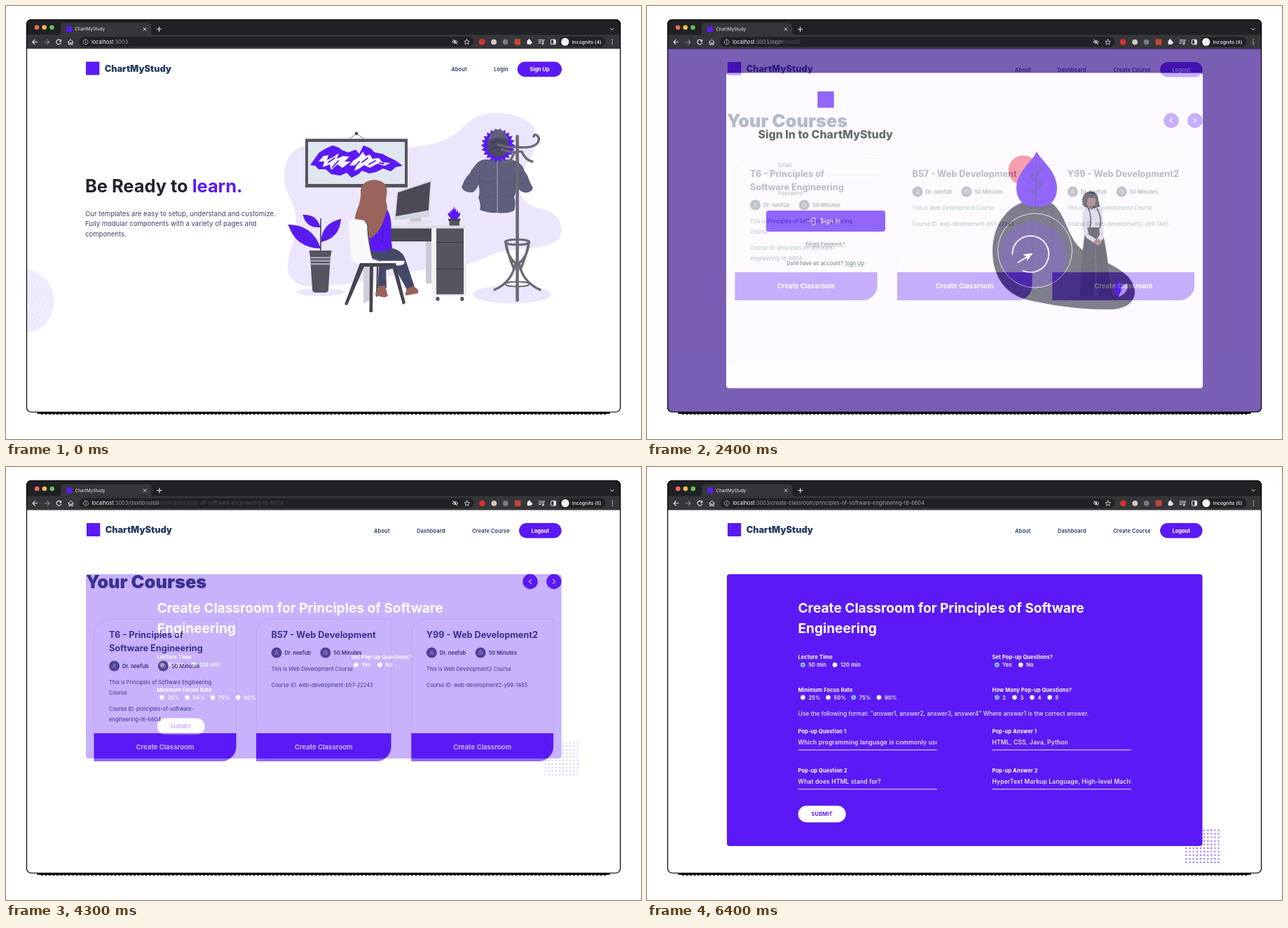
These frames come from a looping animation (906 by 618 pixels, 8 s). An HTML page:

```html
<!DOCTYPE html>
<html lang="en">
<head>
<meta charset="utf-8">
<title>Course platform tour</title>
<style>
html, body { margin: 0; width: 100%; height: 100%; overflow: hidden; background: #fff; }
svg { display: block; }
text { font-family: Inter, "Noto Sans", sans-serif; font-optical-sizing: none; white-space: pre; }
</style>
</head>
<body>
<svg id="stage" width="906" height="618" viewBox="0 0 906 618" xmlns="http://www.w3.org/2000/svg"></svg>
<script>
const BRAND = 'ChartMyStudy', TEACHER = 'Dr. neefub';
const MAIN = '#5b1af5', INK = '#273c60', DARK = '#55545f', PALE = '#ece6fc', NIGHT = '#2f2e41';
const SMALL = 7.43;

// y is the middle of the capital letters
const text = (x, y, s, size, weight = 400, fill = INK, extra = '') =>
  `<text x="${x}" y="${y + size * 0.364}" font-size="${size}" font-weight="${weight}" fill="${fill}" ${extra}>${s}</text>`;
const mid = (x, y, s, size, weight, fill, extra = '') => text(x, y, s, size, weight, fill, 'text-anchor="middle" ' + extra);
const rect = (x, y, w, h, fill, r = 0, extra = '') =>
  `<rect x="${x}" y="${y}" width="${w}" height="${h}" rx="${r}" fill="${fill}" ${extra}/>`;
const disc = (x, y, r, fill, extra = '') => `<circle cx="${x}" cy="${y}" r="${r}" fill="${fill}" ${extra}/>`;
const oval = (x, y, rx, ry, fill, extra = '') => `<ellipse cx="${x}" cy="${y}" rx="${rx}" ry="${ry}" fill="${fill}" ${extra}/>`;
const shape = (d, fill, extra = '') => `<path d="${d}" fill="${fill}" ${extra}/>`;
const line = (d, color, w = 1, extra = '') =>
  `<path d="${d}" fill="none" stroke="${color}" stroke-width="${w}" stroke-linecap="round" stroke-linejoin="round" ${extra}/>`;
const move = (x, y, s) => `<g transform="translate(${x} ${y})">${s}</g>`;

function chrome(path, windows) {
  const w = '#e8eaed', bar = '#35363a', deep = '#202125';
  return rect(20, 10, 866, 51, bar) + rect(20, 10, 866, 31, deep)
    + shape('M74 41Q78 41 78 37V29Q78 24 83 24H202Q207 24 207 29V37Q207 41 211 41Z', bar)
    + disc(44, 30.5, 3.3, '#ee6a5f') + disc(54.6, 30.5, 3.3, '#f5bd4f') + disc(65.4, 30.5, 3.3, '#61c454')
    + rect(86, 29, 8, 8, MAIN, 0.8) + text(98.5, 32.8, BRAND, 6.25, 400, w)
    + line('M196 31l4 4m0-4l-4 4', w, 0.9) + line('M215.2 33h6.6m-3.3-3.3v6.6', w, 1.1)
    + line('M862.3 31.8l2.4 2.4 2.4-2.4', w, 1)
    + line('M44.8 51.3h-7m3.2-3.2l-3.2 3.2 3.2 3.2', w, 1.1)
    + line('M54.8 51.3h7m-3.2-3.2l3.2 3.2-3.2 3.2', '#85878b', 1.1)
    + line('M77.9 49.2A3.4 3.4 0 1 0 78.5 52', w, 1.1) + shape('M78.9 47.3v3.4h-3.4z', w)
    + line('M88.3 51.5l3.9-3.7 3.9 3.7M89.5 51v4h1.9v-2.6h1.6v2.6h1.9v-4', w, 1)
    + rect(104, 44, 563, 14, deep, 7)
    + line('M113.6 47.7a3.5 3.5 0 1 0 .01 0M113.6 51v2', '#c3c6ca', 0.8) + disc(113.6, 49.5, 0.5, '#c3c6ca')
    + text(122, 51.2, `localhost<tspan fill="#9aa0a6">:3003${path}</tspan>`, 7.36, 400, '#f1f3f4')
    + line('M636.8 51.2Q640.5 46.8 644.3 51.2Q640.5 55.6 636.8 51.2M637.5 47.8l6.2 6.8', w, 0.9) + disc(640.5, 51.2, 1.2, w)
    + line('M657.5 47.5l1.1 2.6 2.7.2-2.1 1.8.7 2.7-2.4-1.5-2.4 1.5.7-2.7-2.1-1.8 2.7-.2z', w, 0.8)
    + disc(679, 51.3, 4.4, '#d8322c') + disc(696, 51.3, 3.9, '#d9c8bd') + disc(712.5, 51.3, 3.9, '#777b82')
    + rect(725.5, 47, 8.6, 8.6, '#c2463a', 1)
    + rect(743.4, 49, 5.8, 5.8, w, 0.8) + disc(746.3, 48.6, 1.5, w) + disc(749.2, 51.9, 1.5, w)
    + line('M759.8 48.4h6m-6 2.3h6m-6 2.3h3.2M766.8 53.5v-5h1.4', w, 0.9) + disc(765.8, 53.8, 1.2, w)
    + rect(777.3, 48, 6.8, 6.6, 'none', 0.6, `stroke="${w}"`) + rect(781, 48, 3, 6.6, w)
    + rect(789, 44, 66, 14, deep, 7) + disc(797.6, 51.2, 5.6, '#f1f3f4')
    + text(807.5, 51.2, `Incognito (${windows})`, 6.85, 500, '#f1f3f4')
    + [48.3, 51.2, 54.1].map(y => disc(865, y, 0.8, w)).join('');
}

const pill = (x, y, w, label) => rect(x, y, w, 21.5, MAIN, 10.75) + mid(x + w / 2, y + 11, label, SMALL, 700, '#fff');
const nav = (x, y, s) => mid(x, y, s, SMALL, 600, INK, 'letter-spacing=".15"');
const logo = (x, y) => rect(x, y, 19.3, 19, MAIN, 0.8) + text(x + 26.7, y + 9.5, BRAND, 12.75, 900);

function leaf(x1, y1, x2, y2, b) {
  const mx = (x1 + x2) / 2, my = (y1 + y2) / 2, px = (y2 - y1) * b, py = (x1 - x2) * b;
  return shape(`M${x1} ${y1}Q${mx + px} ${my + py} ${x2} ${y2}Q${mx - px} ${my - py} ${x1} ${y1}`, MAIN)
    + line(`M${x1} ${y1}L${x2} ${y2}`, NIGHT, 0.5);
}

function picture() {
  return line('M490 190L500 182L511 190', DARK, 0.8) + disc(500, 182, 2.2, '#3f3e4a')
    + rect(427, 189.5, 146, 69.5, DARK) + rect(431, 194, 138, 60, '#dfe6ef')
    + shape('M434 227L441 217L447 209L455 204L466 199L475 202L480 206L488 209L499 205L504 211L510 199L520 203L526 209L537 211L546 216L555 220L566 228L556 230L549 236L538 232L528 237L518 239L508 235L503 240L493 245L486 238L477 242L464 240L456 233L446 233L441 228Z', MAIN)
    + shape('M446 222L453 214L460 213L458 220L466 216L475 210L472 218L481 214L490 215L483 222L492 222L480 231L473 226L464 234L462 226L452 230L454 222Z'
      + 'M495 221L504 215L509 208L513 214L519 212L523 218L532 217L537 223L548 224L540 228L530 225L519 231L511 227L504 232L497 235L500 227L490 228Z', '#f5f5fb')
    + line('M460 223l9-6m-3 13l8-9M508 223l8-6m2 9l9-5m6 3l6 1M497 230l7-8', MAIN, 1.8);
}

function plant() {
  return oval(449, 408.5, 35, 5.5, PALE) + line('M449 304V350', DARK, 1.8)
    + leaf(448.5, 316, 423.5, 298, 0.42) + leaf(449, 337, 478, 304, 0.38) + leaf(449, 346, 402.5, 312, 0.36)
    + shape('M432.5 349H464.5L463.5 356H433.5ZM433.8 355H463L460 405Q459.6 409 455 409H442Q437.5 409 437 405Z', DARK)
    + [358, 362.5, 367].map(y => rect(434.6, y, 27.8, 2.4, '#a6a4b8')).join('');
}

function desk() {
  const spikes = [-8, -5, -2.2, 0, 2.2, 5, 8].map(d => {
    const top = 286 + Math.abs(d) * 1.1;
    return `M${637.5 + d / 4} 304Q${636 + d} 297 ${639.5 + d} ${top}Q${642 + d} 297 ${642 + d / 4} 304Z`;
  }).join('');
  return shape('M510 372L519 360V420L510 424Z', '#cfcfd9') + rect(599, 317, 9, 79, '#c9cad5') + rect(607, 317, 7, 103, '#f2f2f6')
    + rect(614, 317, 39, 95, DARK) + rect(653, 317, 4, 96, '#ececf1') + rect(612, 411.5, 43, 2.5, '#ececf1')
    + line('M614 337.5H653M614 375.5H653', '#3c3b47', 1) + oval(616, 418, 2.6, 3, DARK) + oval(650.8, 418, 2.6, 3, DARK)
    + rect(548, 317, 59, 19, '#4a4954') + rect(518, 313.5, 139, 4, '#dedee5')
    + rect(632.5, 305, 14.5, 8.5, DARK, 1) + rect(631, 303.5, 17.5, 3, '#45444f', 0.6) + shape(spikes, MAIN)
    + shape('M576 302L591 299L593 309H577Z', '#c5c7d2') + shape('M569 309L604 305L612 309L577 313Z', '#e2e3ea')
    + shape('M558 265L607 249L604 301L554 306Z', '#d5d7e0') + shape('M559.2 266.2L605.6 251L602.7 291.5L556 300.2Z', '#4b4a56');
}

function sitter() {
  const skin = '#98645c', pants = '#454968';
  return line('M530 372L529 414', '#3f3e4a', 2)
    + shape('M520 348L549 345Q566 349 570 362L583 401L572 405L555 374L542 377L543 402L530 403L532 371L519 363Z', pants)
    + shape('M531 400L541 399L545 414L540 416L527 413Q526 409 530 407Z', skin)
    + shape('M571 404L581 400Q590 404 588 410L572 413Q567 411 571 408Z', skin)
    + shape('M514 296Q530 283 542 288Q552 299 549 330L551 345Q540 353 520 349Z', MAIN)
    + line('M534 300Q540 322 536 340', '#4510c4', 1)
    + shape('M506 264C506 248 531 243 541 255C547 264 540 274 543 282C546 293 540 299 538 309C533 320 527 329 518 332C506 330 498 320 498 308C497 292 507 286 506 264Z', skin)
    + shape('M488 310Q488 304 495 304L510 306Q516 308 516 315Q516 340 522 360L535 364L568 364Q570 369 562 370H521Q498 370 492 362Q491 334 488 310Z', '#fafafc', 'stroke="#e2e2ea" stroke-width=".7"')
    + line('M512 307Q517 311 516 318Q517 340 524 361L534 364', '#494853', 1.3)
    + shape('M505 367H556L570 424L566 426L551 372H524L523 437H518.5L519 372H511L487 427L483 426Z', '#45444f');
}

function coat() {
  const cloth = '#5d5f7d', pole = '#6b6975';
  const fur = Array.from({ length: 44 }, (_, i) => {
    const a = i * Math.PI / 22, r = i % 2 ? 20 : 24.5;
    return (702 + r * Math.cos(a)).toFixed(1) + ' ' + (199 + r * Math.sin(a)).toFixed(1);
  }).join('L');
  const flip = d => line(d, pole, 3.4) + line(d, pole, 3.4, 'transform="matrix(-1 0 0 1 1459 0)"');
  return oval(722, 411.5, 55.5, 13, PALE)
    + shape('M687 219Q675 218 669 228Q664 233 661 240Q654 246 650 259Q654 267 666 266Q672 262 674 255Q677 265 674 274Q678 282 676 291Q688 296 701 295Q715 297 725 292Q728 282 725 273Q729 264 727 253Q731 263 738 266Q748 268 752 260Q747 251 744 242Q740 237 737 229Q729 219 717 219Z', cloth)
    + line('M674 255Q677 248 676 239M727 253Q724 246 726 239M678 250Q688 254 698 250M678 270Q688 274 698 270M704 250Q714 254 724 250M704 270Q714 274 724 270', '#50526f', 0.9)
    + line('M701 222V294', '#8a8ca8', 1.5)
    + shape('M' + fur + 'Z', MAIN) + oval(702, 200, 15.5, 16, '#4b4a63')
    + shape('M688 192Q692 176 702 176Q713 177 717 192Q704 184 688 192Z', '#5d5f7d')
    + line('M694 195Q702 190 712 195M692 204Q702 199 714 204', '#35344a', 1)
    + line('M729.5 186V420', pole, 4.6, 'stroke-linecap="butt"')
    + line('M702 198Q716 203 728 201Q748 204 757 197Q763 190 758 185Q754 182 753 186M709 223Q720 224 723 214Q726 206 736 208Q741 220 751 222M708 205Q722 210 730 208', pole, 3.4)
    + flip('M713 338Q715 358 727 367Q722 394 697 405M713 336Q715 352 725 376')
    + oval(729.5, 337, 17, 3.8, 'none', `stroke="${pole}" stroke-width="3"`)
    + oval(729.5, 397, 17, 3.4, 'none', `stroke="${pole}" stroke-width="2"`);
}

function home() {
  return rect(20, 61, 866, 540, '#fff') + chrome('', 4) + logo(114, 79.5)
    + nav(646.5, 90.5, 'About') + nav(706.5, 90.5, 'Login') + pill(729.7, 79.5, 63.3, 'Sign Up')
    + disc(22, 421.5, 46.5, 'url(#crackle)')
    + text(113, 257, `Be Ready to <tspan fill="${MAIN}">learn.</tspan>`, 25.4, 700, '#20232d')
    + ['Our templates are easy to setup, understand and customize.', 'Fully modular components with a variety of pages and', 'components.']
      .map((s, i) => text(113, 296.5 + i * 14.5, s, 9.55, 400, '#3a4564')).join('')
    + shape('M397 240C398 212 415 195 445 200C500 206 550 207 583 201C640 194 645 176 668 160C690 148 735 150 752 172C765 196 748 215 738 235C726 262 735 284 762 289C790 294 797 315 790 330C775 352 720 342 690 356C660 372 640 371 610 375C560 380 500 398 450 400C420 403 400 395 402 365C408 335 418 320 412 290C405 270 396 262 397 240Z', PALE)
    + picture() + plant() + desk() + sitter() + coat();
}

function clockScene() {
  const skin = '#8f5d60', shirt = '#d0cde1';
  return disc(537, 234.5, 21.3, '#ee6f86')
    + shape('M493 350C493 308 520 277 556 276C588 274 594 306 606 329C622 362 655 358 684 384C705 404 699 433 660 433C620 434 575 427 541 419C508 410 493 382 493 350Z', '#3f3d53')
    + oval(555, 286.5, 23, 3, '#35334a')
    + shape('M556 207.5C562 221 585 235 585 260C585 280 572 287 556 287C540 287 527 279 527 259C528 236 550 222 556 207.5Z', MAIN)
    + line('M554.5 287L556 223M555 262L565 252M555.2 252L546 241M555.5 243L563 232M555 270L545 261M549 245V238M561 256V248', NIGHT, 1)
    + disc(551, 356, 48, '#47308b', 'clip-path="url(#dial)"')
    + disc(553.5, 349, 53, 'none', 'stroke="#dcd9e8" stroke-width="1"')
    + line('M521.2 354A26 26 0 1 1 536.5 377.8', '#fff', 1.8, 'stroke-linecap="butt"')
    + line('M529.5 366L543 357.5', '#fff', 1.8) + shape('M550.5 352.8L536.5 354.5L541.5 357.8L542.5 363.5Z', '#fff')
    + oval(641, 416, 42, 2.6, '#35334a')
    + shape('M622 285Q618 268 631 264.5Q643 264 644 276L646 286Q634 293 622 285Z', NIGHT)
    + shape('M628 274Q633 270 640 274Q641 285 636 287L638 296H628Z', skin)
    + shape('M626 315H648Q657 350 658 375L664 414H644L640 355L637 414H618Q619 360 626 315Z', NIGHT)
    + line('M640 345L641 372', '#454258', 0.8)
    + shape('M622 292L630 287Q635 293 640 288L648 291Q651 297 650 310L652 331L645 339L640 336L646 326L645 316H628L630 326L641 333L638 338L627 331Q619 318 621 306Z', shirt)
    + line('M630 288Q635 303 632 317M642 289Q650 303 646 317', NIGHT, 1.6)
    + shape('M638 335L645 332L649 338L644 342L639 340Z', skin)
    + shape('M623 283Q620 268 632 267Q644 267 644 280L641 274H629L627 285Z', NIGHT)
    + shape('M673 415Q674 398 685 396Q688 409 673 415Z', shirt) + shape('M672 415Q663 404 673 392Q681 402 672 415Z', MAIN);
}

function login() {
  const field = (y, s) => rect(170, y, 170, 29.5, '#fcfaff', 4, 'stroke="#f3f1f7" stroke-width="1"')
    + text(187, y + 14.8, s, SMALL, 500, '#9ba1b0');
  const soft = '#4b5364';
  return rect(20, 61, 866, 540, '#360e8f') + chrome('/login', 4)
    + rect(113, 95.5, 680, 450, '#fcfaff', 4) + rect(243.3, 122, 23.4, 23.3, MAIN, 0.8)
    + mid(254.7, 183.5, 'Sign In to ' + BRAND, 15.9, 800, '#1c212d')
    + field(212.5, 'Email') + field(252.5, 'Password')
    + rect(170, 292, 170, 30, MAIN, 4) + text(247, 307.2, 'Sign In', 8.5, 600, '#fff', 'letter-spacing=".2"')
    + line('M229 307.2h7.5m-3-3l3 3-3 3M236 302.2h2.6q1.4 0 1.4 1.4v7.2q0 1.4-1.4 1.4H236', '#fff', 1)
    + mid(254.6, 339.2, 'Forgot Password ?', 6.37, 500, soft)
    + mid(254.6, 367, 'Dont have an account? Sign Up', SMALL, 500, soft)
    + line('M226.5 343.6H283M282.5 371.6H310', '#7b8190', 0.6, 'stroke-dasharray=".6 1"')
    + clockScene();
}

const member = path => rect(20, 61, 866, 540, '#fff') + move(0.3, 0.5, chrome(path, 5)) + logo(115, 80)
  + nav(536.3, 91, 'About') + nav(606.2, 91, 'Dashboard') + nav(692, 91, 'Create Course') + pill(732, 80, 60.5, 'Logout');

function card(x, w, title, about, id) {
  const r = 21, b = 420, e = x + w, tx = x + 21.5, cy = 246 + title.length * 19;
  const lines = [...about.map((s, i) => [s, cy + 23 + i * 15]), ...id.map((s, i) => [s, cy + 31 + (about.length + i) * 15])];
  const badge = (cx, icon) => disc(cx, cy, 7.5, '#4c5468') + move(cx, cy, line(icon, '#e5e8ef', 0.7));
  return shape(`M${x + r} 217H${e}V${b - r}A${r} ${r} 0 0 1 ${e - r} ${b}H${x}V${217 + r}A${r} ${r} 0 0 1 ${x + r} 217Z`, '#fff', 'stroke="#ececf1" stroke-width="1"')
    + title.map((s, i) => text(tx, 239 + i * 19, s, 12.7, 700)).join('')
    + badge(tx + 7.5, 'M0-2.8a1.4 1.4 0 1 0 .01 0M-2.5 2.8Q-2.3.8 0 .8T2.5 2.8') + text(tx + 19, cy + 0.3, TEACHER, SMALL, 600, '#2a3347')
    + badge(tx + 77.3, 'M0-3a3 3 0 1 0 .01 0M0-1.5V0L1 .8') + text(tx + 89, cy + 0.3, '50 Minutes', SMALL, 600, '#2a3347')
    + lines.map(([s, y]) => text(tx, y, s, SMALL, 400, '#2f4163')).join('')
    + shape(`M${x} 380H${e}V${b - r}A${r} ${r} 0 0 1 ${e - r} ${b}H${x}Z`, MAIN)
    + mid(x + w / 2, 400, 'Create Classroom', 9.5, 700, '#fff');
}

function dashboard() {
  const arrow = (x, d) => disc(x, 163.5, 10.7, MAIN) + move(x, 163.5, line(`M${-d} -3L${d * 1.2} 0L${-d} 3`, '#fff', 1.1));
  return member('/dashboard#') + text(114, 163.5, 'Your Courses', 25.4, 900)
    + arrow(748, -1.5) + arrow(781.8, 1.5)
    + card(125.5, 203, ['T6 - Principles of', 'Software Engineering'], ['This is Principles of Software Engineering', 'Course'], ['Course ID: principles-of-software-', 'engineering-t6-6604'])
    + card(357, 192.5, ['B57 - Web Development'], ['This is Web Development Course'], ['Course ID: web-development-b57-22243'])
    + card(578.3, 202.7, ['Y99 - Web Development2'], ['This is Web Development2 Course'], ['Course ID: web-development2-y99-1485']);
}

function radio(x, y, label, on) {
  return disc(x, y, 3.4, '#fff', on ? '' : 'stroke="#767676" stroke-width=".4"')
    + (on ? disc(x, y, 2.9, 'none', 'stroke="#1f78d8" stroke-width=".9"') + disc(x, y, 1.6, '#1f78d8') : '')
    + text(x + 8, y + 0.4, label, SMALL, 600, '#fff', 'letter-spacing=".18"');
}

function classroom(filled) {
  const bottom = filled ? 541 : 416, top = bottom - 57.5;
  const label = (x, y, s) => text(x, y, s, SMALL, 700, '#fff', 'letter-spacing=".15"');
  const entry = (x, y, name, value) => label(x, y, name)
    + `<svg x="${x}" y="${y + 7.5}" width="198" height="16">${text(0, 8, value, 8.5, 500, '#fff', 'letter-spacing=".2"')}</svg>`
    + rect(x, y + 26.2, 198.3, 1.2, '#d5c5fd');
  let dots = '';
  for (let i = 0; i < 100; i++) dots += disc(769.4 + i % 10 * 5.13, bottom - 22.6 + Math.floor(i / 10) * 5.1, 1.25, '#a585f9');
  let s = member('/create-classroom/principles-of-software-engineering-t6-6604') + dots
    + rect(114, 153, 678.5, bottom - 153, MAIN, 4)
    + text(215.5, 201.5, 'Create Classroom for Principles of Software', 19.1, 700, '#fff')
    + text(215.5, 230, 'Engineering', 19.1, 700, '#fff')
    + label(215.5, 271, 'Lecture Time') + radio(222.4, 282.3, '50 min', filled) + radio(268, 282.3, '120 min')
    + label(492.5, 271, 'Set Pop-up Questions?') + radio(499.3, 282.3, 'Yes', filled) + radio(533.2, 282.3, 'No')
    + label(215.5, 318, 'Minimum Focus Rate')
    + ['25%', '50%', '75%', '90%'].map((v, i) => radio(222.4 + i * 36.2, 328.8, v, filled && i === 2)).join('');
  if (filled) s += label(492.5, 318, 'How Many Pop-up Questions?')
    + [2, 3, 4, 5].map((v, i) => radio(499.3 + i * 25.1, 328.8, v, !i)).join('')
    + text(215.5, 352.3, 'Use the following format: "answer1, answer2, answer3, answer4" Where answer1 is the correct answer.', 8.5, 400, '#fff')
    + entry(215.5, 377, 'Pop-up Question 1', 'Which programming language is commonly used for the web?')
    + entry(492.5, 377, 'Pop-up Answer 1', 'HTML, CSS, Java, Python')
    + entry(215.5, 433, 'Pop-up Question 2', 'What does HTML stand for?')
    + entry(492.5, 433, 'Pop-up Answer 2', 'HyperText Markup Language, High-level Machine Language');
  return s + rect(216, top + 1.5, 68, 23.5, '#3a0bb0', 11.8, 'opacity=".35"') + rect(215.7, top, 68, 23.7, '#fff', 11.8)
    + mid(249.6, top + 12, 'SUBMIT', SMALL, 700, MAIN, 'letter-spacing=".15"');
}

const stage = document.getElementById('stage');
stage.innerHTML = `<defs>
  <clipPath id="win"><rect x="29" y="19" width="848" height="561" rx="7"/></clipPath>
  <clipPath id="dial"><circle cx="553.5" cy="349" r="53"/></clipPath>
  <pattern id="crackle" width="5" height="5" patternUnits="userSpaceOnUse" patternTransform="rotate(18)">
    <path d="M0 1.2L1.6.4 3 1.6 5 1.2M.4 3.8L2 2.8 3.4 4.2 5 3.4M2 2.8L3 1.6M.6 5L.4 3.8" fill="none" stroke="#d9cbfb" stroke-width=".9"/>
  </pattern></defs>`
  + line('M45 581H861', '#000', 2) + line('M50 582.6H856', '#000', 1, 'stroke-dasharray="3 2.5"')
  + '<g clip-path="url(#win)">'
  + [home(), login(), dashboard(), classroom(false), classroom(true)].map(s => `<g class="scene">${s}</g>`).join('')
  + '</g>' + rect(29.5, 19.5, 847, 560, 'none', 6.5, 'stroke="#000" stroke-width="1.2"');

const scenes = [...stage.querySelectorAll('.scene')];
const starts = [0, 500, 2400, 4300, 6200], LOOP = 8000;

// each page dissolves over the previous one in thirds, 100 ms apart
function draw(ms) {
  const now = starts.filter(s => s <= ms).length - 1;
  const mix = now ? Math.min(1, (Math.floor((ms - starts[now]) / 100) + 1) / 3) : 1;
  scenes.forEach((g, i) => {
    const shown = i === now || (i === now - 1 && mix < 1);
    g.style.display = shown ? '' : 'none';
    g.style.opacity = i === now ? mix : 1;
  });
}

const begin = performance.now();
function tick() {
  draw((performance.now() - begin) % LOOP);
  requestAnimationFrame(tick);
}
tick();
</script>
</body>
</html>
```
